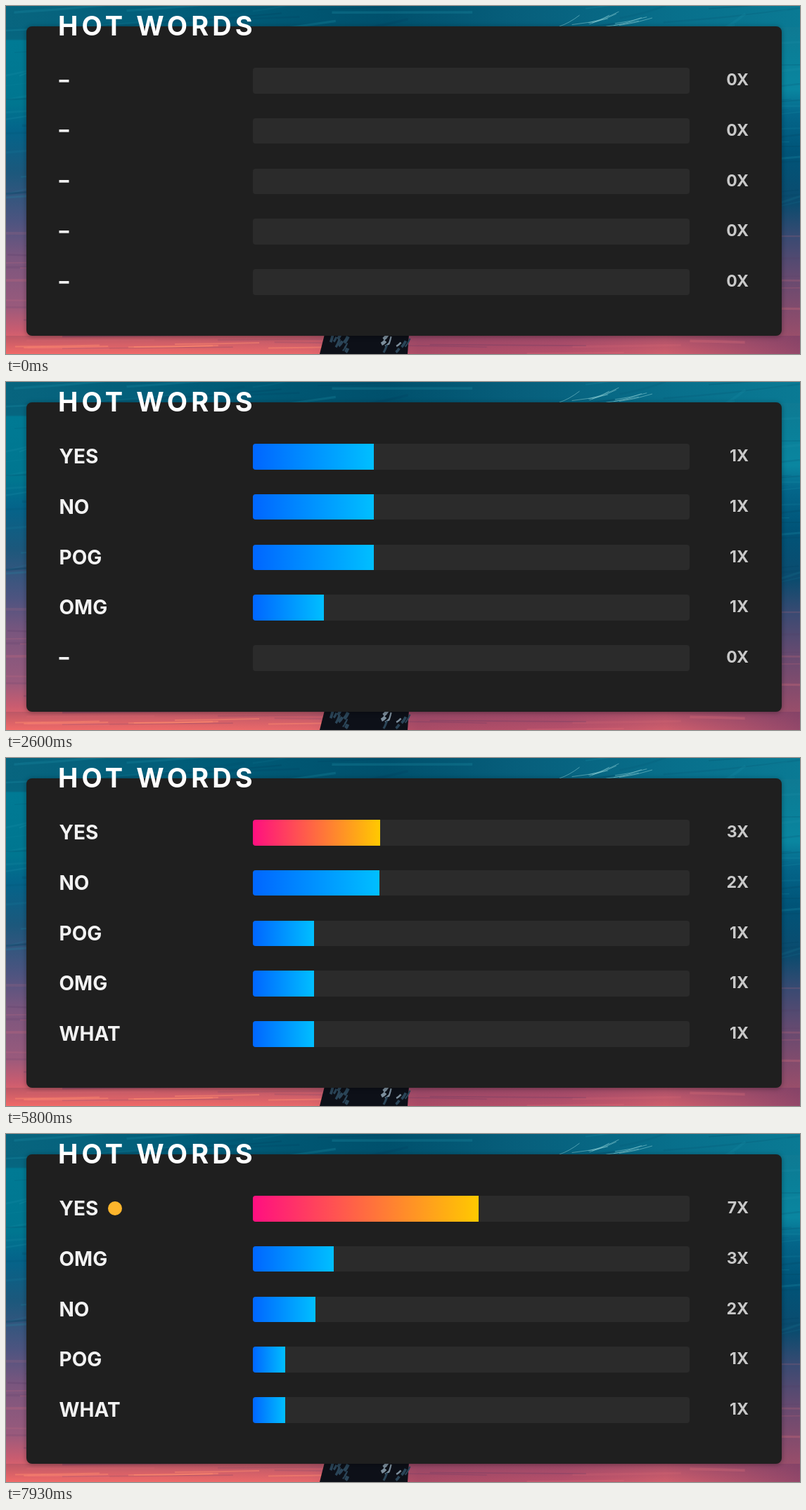
Animation of 1129x496 px, one loop 8 s. Source, as an HTML page with a canvas:

```html
<!DOCTYPE html>
<html lang="en">
<head>
<meta charset="utf-8">
<title>Hot words</title>
<style>
html, body { margin: 0; width: 100%; height: 100%; overflow: hidden; background: #1f1f1f; }
body { position: relative; font-family: Inter, "Open Sans", sans-serif; font-weight: 700; }
canvas { position: absolute; left: 0; top: 0; }
.panel { position: absolute; left: 29px; top: 29px; width: 1074px; height: 441px; border-radius: 8px; background: #1f1f1f; box-shadow: 0 1px 7px rgba(0, 0, 0, .35); }
h1 { position: absolute; left: 74px; top: 8px; margin: 0; font-size: 38px; line-height: 40px; font-weight: 700; letter-spacing: 5.1px; color: #fff; white-space: nowrap; }
.row { position: absolute; left: 0; width: 1129px; height: 36.4px; line-height: 36px; }
.word { position: absolute; left: 75.5px; font-size: 28px; color: #f2f2f2; }
.dash .word { top: -1.5px; font-weight: 800; }
.mark { position: absolute; left: 141px; top: 8px; width: 20px; height: 20px; border-radius: 50%; background: #fdb52c; visibility: hidden; }
.track { position: absolute; left: 351px; width: 621px; height: 100%; border-radius: 4px; overflow: hidden; background: #2b2b2b; }
.bar { height: 100%; width: 0; background: linear-gradient(90deg, #0066ff, #00bfff); }
.hot .bar { background: linear-gradient(90deg, #ff0f80, #ffc900); }
.count { position: absolute; right: 73px; top: -1px; font-size: 23px; color: #c9c9c9; }
</style>
</head>
<body>
<canvas width="1129" height="496"></canvas>
<div class="panel"></div>
<h1>HOT WORDS</h1>
<script>
const LOOP = 8000, GROW = 400, MARK_DELAY = 60, HOT_SHARE = 33;

// Each message: time it arrives, word it counts.
const MESSAGES = [
  [901, 'YES'], [1275, 'NO'], [1790, 'POG'], [2449, 'OMG'], [2915, 'WHAT'],
  [3798, 'YES'], [4255, 'NO'],
  [5792, 'YES'], [5957, 'YES'], [6125, 'YES'], [6290, 'YES'], [6455, 'YES'],
  [7460, 'OMG'], [7796, 'OMG']
];

const el = (parent, cls) => {
  const node = document.createElement('div');
  node.className = cls;
  return parent.appendChild(node);
};

const rows = Array.from({ length: 5 }, (_, i) => {
  const box = el(document.body, 'row');
  box.style.top = 88.2 + i * 71.75 + 'px';
  return {
    box, word: el(box, 'word'), mark: el(box, 'mark'),
    bar: el(el(box, 'track'), 'bar'), count: el(box, 'count')
  };
});

// cubic-bezier(.25, .1, .25, 1)
function ease(x) {
  if (x <= 0) return 0;
  if (x >= 1) return 1;
  const bez = (s, a, b) => 3 * (1 - s) * (1 - s) * s * a + 3 * (1 - s) * s * s * b + s * s * s;
  let lo = 0, hi = 1;
  for (let i = 0; i < 24; i++) {
    const mid = (lo + hi) / 2;
    if (bez(mid, .25, .25) < x) lo = mid; else hi = mid;
  }
  return bez(lo, .1, 1);
}

const widthAt = (s, t) => s.from + (s.to - s.from) * ease((t - s.start) / GROW);

function stateAt(t) {
  const words = [];
  const state = rows.map(() => ({ text: '–', n: 0, from: 0, to: 0, start: 0, hotSince: Infinity }));
  let total = 0;
  for (const [time, text] of MESSAGES) {
    if (time > t) break;
    let entry = words.find(w => w.text === text);
    if (!entry) words.push(entry = { text, n: 0 });
    entry.n++;
    total++;
    words.sort((a, b) => b.n - a.n);
    words.forEach((w, i) => {
      const s = state[i], share = Math.round(100 * w.n / total);
      if (share !== s.to) {
        s.from = widthAt(s, time);
        s.to = share;
        s.start = time;
      }
      s.hotSince = share >= HOT_SHARE ? Math.min(s.hotSince, time) : Infinity;
      s.text = w.text;
      s.n = w.n;
    });
  }
  return state;
}

function setText(node, text) {
  if (node.textContent !== text) node.textContent = text;
}

function render(t) {
  stateAt(t).forEach((s, i) => {
    const r = rows[i];
    setText(r.word, s.text);
    setText(r.count, s.n + 'X');
    r.box.classList.toggle('dash', !s.n);
    r.box.classList.toggle('hot', s.hotSince <= t);
    r.mark.style.left = 89 + r.word.offsetWidth + 'px';
    r.mark.style.visibility = t >= s.hotSince + MARK_DELAY ? 'visible' : 'hidden';
    r.bar.style.width = widthAt(s, t) + '%';
  });
}

function paintBackdrop() {
  const c = document.querySelector('canvas').getContext('2d');
  let seed = 11;
  const rnd = () => (seed = seed * 16807 % 2147483647) / 2147483647;
  const fill = (x, y, w, h, across, ...colors) => {
    const g = c.createLinearGradient(x, y, across ? x + w : x, across ? y : y + h);
    colors.forEach(([at, color]) => g.addColorStop(at, color));
    c.fillStyle = g;
    c.fillRect(x, y, w, h);
  };
  const streak = (x, y, len, rise, width, color) => {
    c.strokeStyle = color;
    c.lineWidth = width;
    c.beginPath();
    c.moveTo(x, y);
    c.quadraticCurveTo(x + len / 2, y - rise * .3, x + len, y - rise);
    c.stroke();
  };

  // Sides, top and bottom around the panel
  fill(0, 0, 565, 496, false, [0, '#06607c'], [.095, '#066680'], [.1, '#007a94'], [.28, '#007690'],
    [.36, '#04648a'], [.48, '#1c587c'], [.62, '#4d5480'], [.72, '#7a567e'], [.86, '#985a7c'], [.93, '#c85c70'], [1, '#f86c66']);
  fill(565, 0, 564, 496, false, [0, '#12768f'], [.14, '#0a7f98'], [.24, '#0a86a0'], [.31, '#04668a'],
    [.42, '#005478'], [.57, '#0c4b6e'], [.67, '#3c4a72'], [.78, '#664a70'], [.9, '#8a4c6c'], [1, '#a85068']);
  fill(0, 0, 1129, 30, true, [0, '#08657f'], [.25, '#005c78'], [.48, '#00506c'],
    [.65, '#075f7c'], [.85, '#08708c'], [1, '#0a7a94']);
  fill(0, 470, 1129, 26, true, [0, '#f06a68'], [.2, '#f06a68'], [.38, '#e8686a'], [.52, '#ac4c66'],
    [.7, '#b8506a'], [.83, '#d05e6c'], [1, '#94486a']);
  fill(0, 470, 1129, 26, false, [0, 'rgba(110,60,100,.4)'], [1, 'rgba(110,60,100,0)']);

  for (let i = 0; i < 260; i++) {
    const y = rnd() * 496, low = y > 300;
    const light = rnd() > .5;
    const color = light ? (low ? '240,120,125' : '30,145,168') : (low ? '80,55,100' : '0,65,95');
    streak(rnd() * 1200 - 120, y, 40 + rnd() * 260, low ? rnd() * 6 - 3 : rnd() * 30,
      .8 + rnd() * 3, `rgba(${color},${.1 + rnd() * .18})`);
  }
  for (let i = 0; i < 9; i++)
    streak(775 + rnd() * 100, 30 - rnd() * 6, 25 + rnd() * 30, 7 + rnd() * 9, 1, 'rgba(150,215,220,.5)');
  for (let i = 0; i < 6; i++)
    streak(rnd() * 380, 478 + rnd() * 16, 120, 2, 2, 'rgba(255,140,110,.45)');

  // Dark figure below the panel
  c.fillStyle = '#0d1018';
  c.beginPath();
  c.moveTo(453, 468);
  c.lineTo(573, 468);
  c.lineTo(571, 496);
  c.lineTo(446, 496);
  c.fill();
  for (let i = 0; i < 18; i++) {
    const x = i % 2 ? 453 + rnd() * 35 : 532 + rnd() * 36;
    streak(x, 474 + rnd() * 20, 3 + rnd() * 4, 4 + rnd() * 8, 2 + rnd() * 3, i % 4 ? '#2b4558' : '#7d8f9d');
  }
}

paintBackdrop();
const began = performance.now();
function tick() {
  render((performance.now() - began) % LOOP);
  requestAnimationFrame(tick);
}
render(0);
requestAnimationFrame(tick);
</script>
</body>
</html>
```
